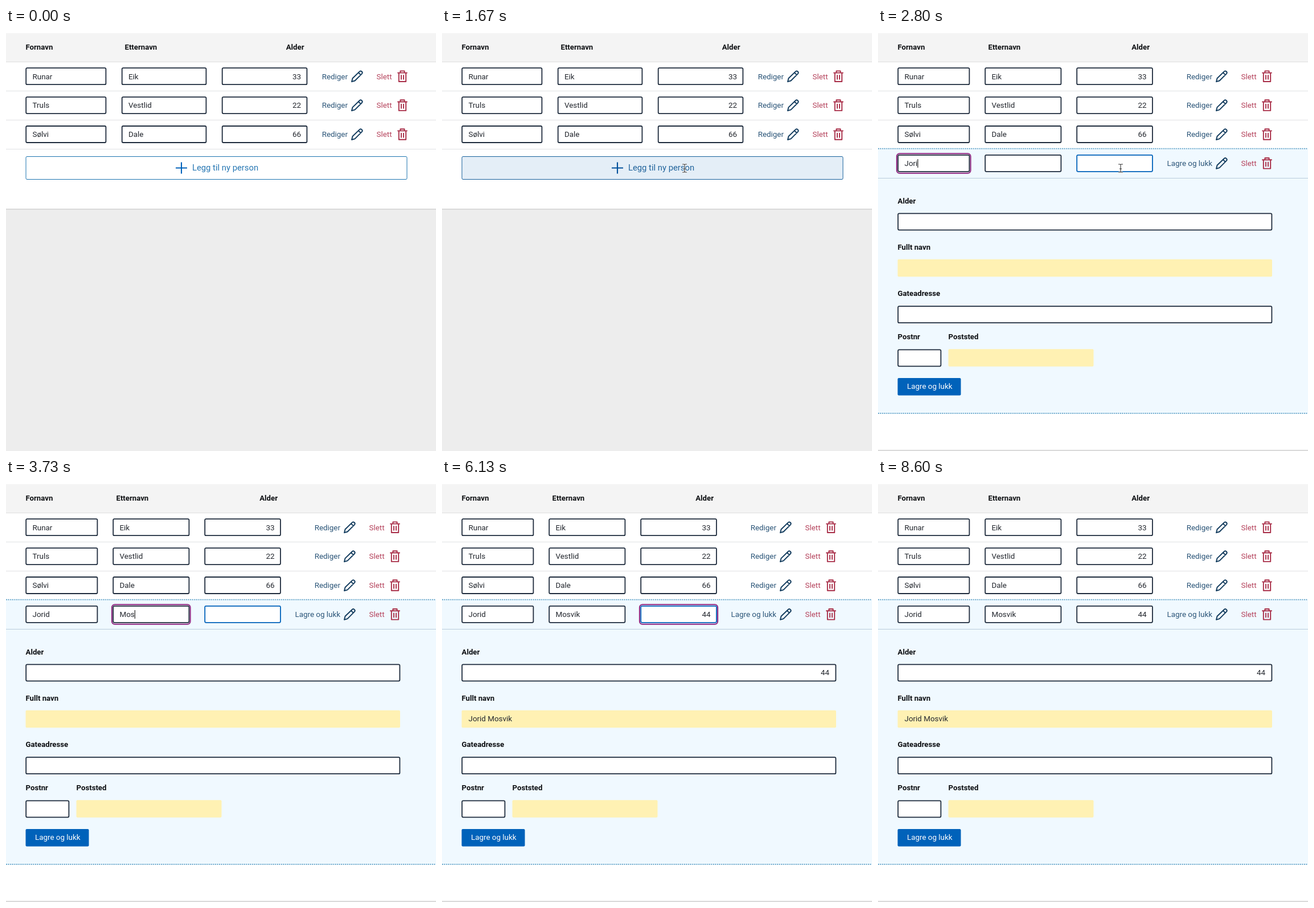
An HTML page for the animation above (8670 ms loop, 755 px wide and 742 px high).

```html
<!DOCTYPE html>
<html lang="no">
<head>
<meta charset="utf-8">
<title>Personer</title>
<style>
html, body { margin: 0; width: 100%; height: 100%; overflow: hidden; background: #ededed; }
svg { display: block; width: 755px; height: 742px; }
text { font: 13.4px Roboto, "Noto Sans", sans-serif; fill: #23272e; white-space: pre; }
.b { font-size: 13.2px; font-weight: 700; fill: #0d0f12; }
.r { text-anchor: end; }
.edit { fill: #2b5578; }
.del { fill: #b5435c; }
.field { fill: #fff; stroke: #1e2b3c; stroke-width: 1.8; }
.calc { fill: #fff1b3; }
.icon { fill: none; stroke-width: 1.9; stroke-linejoin: round; }
.dots { stroke: #3f8fbd; stroke-width: 1.7; stroke-dasharray: 1.7 1.7; }
</style>
</head>
<body>
<svg id="stage" viewBox="0 0 755 742"></svg>
<script>
const LOOP = 8670, OPEN = 1730;
const people = [["Runar", "Eik", "33"], ["Truls", "Vestlid", "22"], ["Sølvi", "Dale", "66"]];
const FIRST = "Jorid", LAST = "Mosvik", AGE = "44";

const rect = (x, y, w, h, fill, more = "") =>
  `<rect x="${x}" y="${y}" width="${w}" height="${h}" fill="${fill}" ${more}/>`;
const text = (x, y, s, cls = "", more = "") => `<text x="${x}" y="${y}" class="${cls}" ${more}>${s}</text>`;
const field = (l, r, y, id = "") =>
  `<rect class="field" x="${l + .7}" y="${y + 1}" width="${r - l - 1.3}" height="29" rx="2" ${id && `id="${id}"`}/>`;
const calc = (l, r, y) => `<rect class="calc" x="${l}" y="${y}" width="${r - l}" height="30.5" rx="2"/>`;
const hline = (y, color) => rect(0, y, 755, 1, color);
const dots = y => `<path class="dots" d="M0 ${y}H755"/>`;

const pencil = (x, y) => `<path class="icon" stroke="#123b5d" transform="translate(${x} ${y})"
  d="M1 20L2.5 14L15 1.9Q16.7.4 18.6 2.1Q20.6 4 19 5.9L6.6 18.3ZM12.8 4.1L17 8.2"/>`;
const trash = (x, y) => `<path class="icon" stroke="#a82d47" transform="translate(${x} ${y})"
  d="M.3 4.4H17.7M5.4 4V1.2H12.6V4M2.8 4.6V19.8H15.2V4.6M7 8V16.4M11 8V16.4"/>`;

function tools(y, right, label) {
  return text(right - 105, y + 20.3, label, "edit r") + pencil(right - 99, y + 5) +
    text(right - 54.5, y + 20.3, "Slett", "del") + trash(right - 18, y + 5);
}

// Header and saved rows; cols holds the left and right edges of the three fields
function table(cols, heads, right) {
  let s = rect(0, 9, 755, 50, "#f4f4f4") + hline(59, "#dedede") +
    text(heads[0], 37.5, "Fornavn", "b") + text(heads[1], 37.5, "Etternavn", "b") +
    text(heads[2], 37.5, "Alder", "b r");
  people.forEach((p, i) => {
    const y = 69.2 + 50.9 * i;
    cols.forEach(([l, r], c) => {
      s += field(l, r, y) + (c < 2 ? text(l + 12, y + 20.3, p[c]) : text(r - 11, y + 20.3, p[c], "r"));
    });
    s += tools(y, right, "Rediger");
    if (i < 2) s += hline(110 + 51 * i, "#e0e2e4");
  });
  return s;
}

const wide = [[34.5, 176], [203, 352], [379, 529]];
const slim = [[34.5, 161], [187.5, 322], [348.5, 482.5]];

const listView = rect(0, 0, 755, 317, "#fff") + hline(317, "#cfcfcf") + hline(318, "#e2e2e2") +
  table(wide, [34.5, 208.5, 523.5], 705) + hline(212, "#e0e2e4") +
  rect(35, 225.5, 669, 40, "#fff", 'id="add" rx="2" stroke="#1d6fb0"') +
  `<path id="plus" d="M298 245.5H318M308 235.5V255.5" stroke="#0062ba" stroke-width="2.1"/>` +
  text(327, 250.2, "Legg til ny person", "", 'id="addText" style="font-size:14.8px"');

const formView = rect(0, 0, 755, 742, "#fff") + rect(0, 212, 755, 464, "#f0f9ff") +
  table(slim, [34.5, 193.5, 477], 692) + dots(211.6) + hline(263, "#bacddb") + dots(675.8) +
  hline(740, "#d2d2d2") + hline(741, "#e0e0e0") +
  rect(0, 220.3, 0, 34.4, "#fff", 'id="ring" rx="5" stroke="#8d2380" stroke-width="2"') +
  slim.map(([l, r], i) => field(l, r, 221.8, "in" + i)).join("") +
  text(46.5, 242, "", "", 'id="first"') + text(199.5, 242, "", "", 'id="last"') +
  text(471.5, 242, "", "r", 'id="age"') + rect(0, 230, 1.1, 15, "#111", 'id="caret"') +
  tools(221.8, 692, "Lagre og lukk") +
  text(34.5, 307.5, "Alder", "b") + field(34.5, 692, 324.3) +
  text(680, 343.5, "", "r", 'id="ageCopy"') +
  text(34.5, 388.7, "Fullt navn", "b") + calc(34.5, 692, 405.7) +
  text(46.5, 425, "", "", 'id="full"') +
  text(34.5, 470, "Gateadresse", "b") + field(34.5, 692, 487.2) +
  text(34.5, 546.3, "Postnr", "b") + field(34.5, 111, 563.3) +
  text(123.5, 546.3, "Poststed", "b") + calc(123.5, 378.5, 563.3) +
  rect(34.5, 614, 111, 30.5, "#0062ba", 'rx="2"') +
  text(51, 633.3, "Lagre og lukk", "", 'style="fill:#fff"');

const beam = "M-4 -7H-1L0 -6L1 -7H4M0 -6V6M-4 7H-1L0 6L1 7H4M-2 1H2";
const arrow = "M0 0V12.8L3 10.1L5 14.6L7.3 13.6L5.3 9.2H9.3Z";

const stage = document.getElementById("stage");
stage.innerHTML = `<g id="list">${listView}</g><g id="form">${formView}</g>
  <g id="mouse"><g id="beam" fill="none"><path d="${beam}" stroke="#fff" stroke-width="2.6"/>
  <path d="${beam}" stroke="#333" stroke-width="1.1"/></g>
  <path id="arrow" d="${arrow}" fill="#111" stroke="#fff" stroke-width="1"/></g>`;
const ui = {};
stage.querySelectorAll("[id]").forEach(e => ui[e.id] = e);

const keys = {
  first: [2270, 2400, 2530, 2730, 2870],
  last: [3400, 3540, 3670, 3870, 4000, 4140],
  age: [5060, 5250]
};
const focusAt = [OPEN, 3200, 4330], BLUR = 7670;
const resets = [...focusAt, ...keys.first, ...keys.last, ...keys.age].sort((a, b) => a - b);

// time, x, y
const path = [[400, 530, 760], [900, 440, 300], [1200, 426, 246], [6650, 426, 246],
  [7050, 442, 314], [8130, 442, 314], [8200, 710, 318], [8260, 770, 319]];
const hidden = t => t < 400 || (t > 3700 && t < 6650) || t > 8260;

function mouseAt(t) {
  if (t <= path[0][0]) return path[0].slice(1);
  for (let i = 1; i < path.length; i++) {
    const [t0, x0, y0] = path[i - 1], [t1, x1, y1] = path[i];
    if (t > t1) continue;
    const u = (t - t0) / (t1 - t0), e = u * u * (3 - 2 * u);
    return [x0 + (x1 - x0) * e, y0 + (y1 - y0) * e];
  }
  return path[path.length - 1].slice(1);
}

const show = (e, on) => e.style.display = on ? "" : "none";
const typed = (s, times, t) => s.slice(0, times.filter(k => k <= t).length);

function drawForm(t, my) {
  ui.first.textContent = typed(FIRST, keys.first, t);
  ui.last.textContent = typed(LAST, keys.last, t);
  ui.age.textContent = typed(AGE, keys.age, t);
  ui.full.textContent = t < 3740 ? "" : t < 4930 ? FIRST : FIRST + " " + LAST;
  ui.ageCopy.textContent = t < 5800 ? "" : AGE;
  ui.in2.style.stroke = my < 253 ? "#0062ba" : "#1e2b3c";

  const on = t < BLUR, n = focusAt.filter(f => f <= t).length - 1;
  const blinkFrom = resets.filter(r => r <= t).pop();
  show(ui.ring, on);
  show(ui.caret, on && (t - blinkFrom) % 1000 < 500);
  if (!on) return;
  const [l, r] = slim[n];
  ui.ring.setAttribute("x", l - 1.6);
  ui.ring.setAttribute("width", r - l + 3.2);
  const target = n ? ui.last : ui.first;
  const end = target.textContent ? target.getComputedTextLength() : 0;
  ui.caret.setAttribute("x", n === 2 ? 470 : l + 12 + end);
}

function draw(t) {
  const open = t >= OPEN, [mx, my] = mouseAt(t);
  show(ui.list, !open);
  show(ui.form, open);
  if (open) drawForm(t, my);
  else {
    const over = my > 225 && my < 266;
    ui.add.style.fill = over ? "#e4eef7" : "#fff";
    ui.add.style.stroke = over ? "#17609c" : "#1d75b0";
    ui.plus.style.stroke = over ? "#00509b" : "#0062ba";
    ui.addText.style.fill = over ? "#20639b" : "#2777b3";
  }
  const overText = open ? my < 253 : my > 236 && my < 256;
  show(ui.mouse, !hidden(t));
  show(ui.beam, overText);
  show(ui.arrow, !overText);
  ui.mouse.setAttribute("transform", `translate(${mx} ${my})`);
}

const start = performance.now();
function tick() {
  draw((performance.now() - start) % LOOP);
  requestAnimationFrame(tick);
}
tick();
</script>
</body>
</html>
```
